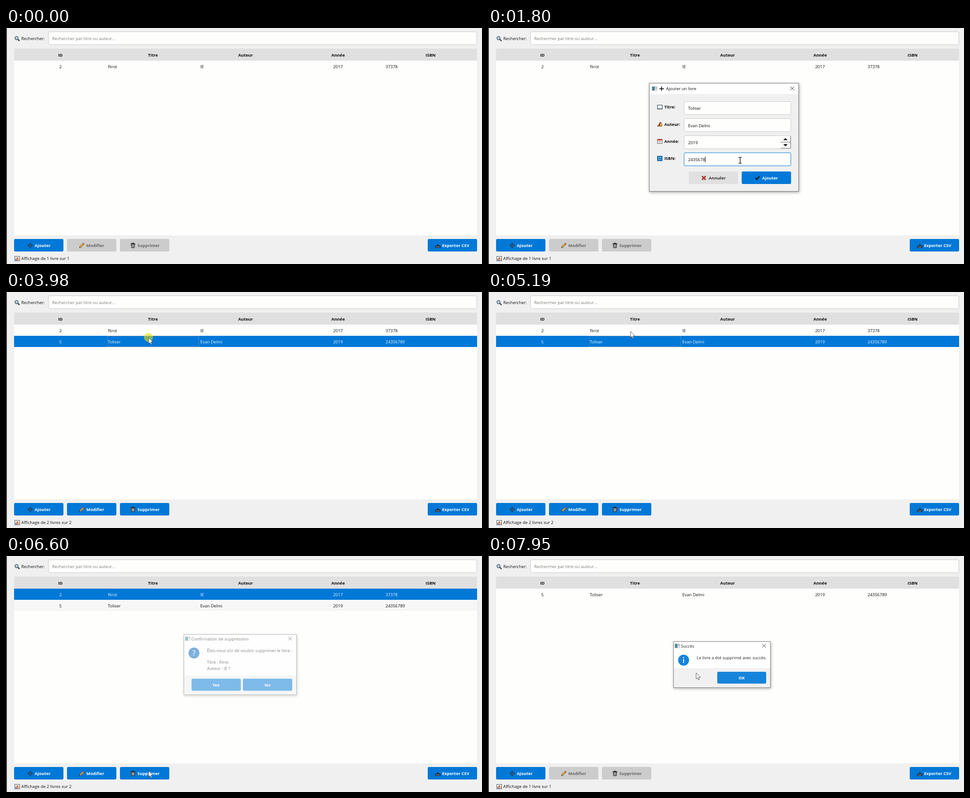
An HTML page for the animation above (8000 ms loop, 1061 by 528 pixels).

```html
<!DOCTYPE html>
<html lang="fr">
<head>
<meta charset="utf-8">
<title>Gestion de livres</title>
<style>
html, body { margin: 0; width: 100%; height: 100%; overflow: hidden; background: #f0f0f0; }
svg { display: block; width: 1061px; height: 528px; }
text { font: 9.45px "Open Sans", "Noto Sans", sans-serif; white-space: pre; }
.b { font-weight: 700; }
.m { text-anchor: middle; }
</style>
</head>
<body>
<svg id="stage" viewBox="0 0 1061 528"></svg>
<script>
const LOOP = 8000;
const BLUE = '#0078d7', HOVER = '#1484d9', DOWN = '#006abd', GREY = '#cccccc';
const BOOKS = {
  A: ['2', 'flirot', 'IE', '2017', '37378'],
  B: ['5', 'Toliser', 'Evan Delmi', '2019', '24356789']
};
const pen = document.createElement('canvas').getContext('2d');
pen.font = '9.45px "Open Sans", "Noto Sans", sans-serif';

const START = {
  list: 'A', total: 1, sel: '', cell: false, query: '', caret: false,
  dlg: '', fade: 1, cur: null, beam: false, halo: false,
  add: BLUE, del: BLUE, ok: BLUE,
  title: '', author: '', year: '2025', isbn: '', focus: 'title', picked: false
};

// [time in ms, what changes]
const STEPS = [
  [120, { cur: [74, 482], add: DOWN, halo: true }],
  [170, { add: HOVER, halo: false }],
  [310, { dlg: 'form', fade: .5, add: BLUE }],
  [405, { fade: 1, cur: [530, 180], beam: true }],
  [500, { title: 'Toli' }],
  [595, { title: 'Toliser' }],
  [690, { focus: 'author', cur: [545, 218] }],
  [785, { author: 'Evan' }],
  [880, { author: 'Evan Del' }],
  [975, { author: 'Evan Delmi' }],
  [1070, { focus: 'year', picked: true, cur: [671, 262], beam: false }],
  [1200, { year: '2', picked: false }],
  [1290, { year: '20' }],
  [1380, { year: '201' }],
  [1470, { year: '2019' }],
  [1670, { focus: 'isbn', cur: [562, 296], beam: true }],
  [1735, { isbn: '2435' }],
  [1800, { isbn: '2435678' }],
  [2000, { isbn: '24356789' }],
  [2110, { cur: [634, 340], beam: false, ok: HOVER }],
  [2350, { ok: DOWN, halo: true }],
  [2435, { dlg: '', halo: false, ok: BLUE, list: 'AB', total: 2 }],
  [2520, { dlg: 'done', fade: .9, cur: [566, 272] }],
  [2605, { fade: 1, ok: DOWN, halo: true }],
  [2690, { dlg: '', ok: BLUE, halo: false, cur: [218, 36], beam: true }],
  [2870, { query: 't', caret: true, list: 'AB' }],
  [2930, { query: 'to', list: 'B' }],
  [2990, { query: 'toli' }],
  [3180, { query: '', list: 'AB' }],
  [3350, { query: 'fl', list: 'A' }],
  [3550, { query: '', list: 'AB' }],
  [3680, { caret: false, cur: [317.5, 101.5], beam: false }],
  [3980, { sel: 'B', cell: true, halo: true }],
  [4180, { halo: false }],
  [4440, { cur: [317.5, 99] }],
  [4505, { cur: [317.5, 97] }],
  [4570, { cur: [317.5, 94] }],
  [4640, { cur: [317.5, 92] }],
  [5120, { cur: [317.5, 90] }],
  [5190, { cur: [317.5, 88] }],
  [5470, { sel: 'A', halo: true }],
  [5730, { halo: false }],
  [5810, { cur: [317.5, 140] }],
  [5890, { cur: [317.5, 250] }],
  [5970, { cur: [317.5, 370] }],
  [6050, { cur: [317.5, 452] }],
  [6130, { cur: [317.5, 480], del: HOVER }],
  [6320, { del: DOWN, cell: false, halo: true }],
  [6520, { del: BLUE, halo: false, dlg: 'confirm', fade: .5 }],
  [6615, { fade: 1 }],
  [6710, { cur: [345, 440] }],
  [6805, { cur: [405, 362] }],
  [6900, { cur: [455, 302] }],
  [7000, { cur: [476, 280], ok: HOVER }],
  [7310, { ok: DOWN, halo: true }],
  [7500, { ok: HOVER, halo: false }],
  [7605, { dlg: '', cur: [470, 270] }],
  [7710, { list: 'B', total: 1, sel: '', ok: BLUE, cur: [463.5, 261] }],
  [7810, { dlg: 'done', fade: .4 }],
  [7950, { fade: .91 }]
];
let last = START;
const STATES = [[0, START], ...STEPS.map(([t, p]) => [t, last = { ...last, ...p }])];

const rect = (x, y, w, h, fill, more = '') =>
  `<rect x="${x}" y="${y}" width="${w}" height="${h}" fill="${fill}" ${more}/>`;
const path = (d, fill, stroke = 'none', w = 1) =>
  `<path d="${d}" fill="${fill}" stroke="${stroke}" stroke-width="${w}"/>`;
const text = (x, y, s, cls = '', fill = '#111') =>
  `<text x="${x}" y="${y}" class="${cls}" fill="${fill}">${s}</text>`;
const disc = (x, y, r, fill) => `<circle cx="${x}" cy="${y}" r="${r}" fill="${fill}"/>`;
const at = (x, y, s) => `<g transform="translate(${x} ${y})">${s}</g>`;
const caretAt = (x, y, s) => rect(x + pen.measureText(s).width, y, 1, 13.5, '#000');

const icons = {
  lens: path('M7 7L11 11', 'none', '#222', 2.2) +
    '<circle cx="4.6" cy="4.6" r="3.7" fill="#a8d4ee" stroke="#444" stroke-width="1.2"/>',
  plus: path('M6 .8V11.2M.8 6H11.2', 'none', '#0a1a2c', 3) + path('M6 1.6V10.4M1.6 6H10.4', 'none', '#6f9fc8', .9),
  pencil: path('M.8 11.3L2 7.8L8.6 1.2L11 3.5L4.3 10.2Z', '#f2ad35', '#3c2c1c', .8) +
    path('M8 1.8L9.3 .6L11.6 2.8L10.3 4.1Z', '#d7796c', '#3c2c1c', .6) + path('M.6 11.5L1.3 9.3L2.8 10.8Z', '#222'),
  bin: path('M1.8 3H10.2L9.2 11.6H2.8Z', '#707477', '#2b2b2b', .9) + path('M.9 2.4H11.1M4 1H8', 'none', '#2b2b2b', 1.5) +
    path('M4.4 4.5V10M6 4.5V10M7.6 4.5V10', 'none', '#c4c8ca', .7),
  tray: path('M.5 7L3 5.5H10L12.5 7V11H.5Z', '#14273a') + path('M2 8.8H11', 'none', '#c9d3da', 1) +
    path('M5.3 1H7.7V4H9.6L6.5 7.3L3.4 4H5.3Z', '#16283c', '#7aa6cc', .4),
  chart: rect(.6, .6, 10.8, 9.8, '#f7f9fa', 'stroke="#454b50"') + rect(2.2, 5, 2, 5, '#3c7fc0') +
    rect(5, 2.5, 2, 7.5, '#d0483a') + rect(7.8, 4, 2, 6, '#e2a33a'),
  book: path('M.8 1H11.4V9.2H.8Z', '#fbfbf6', '#25384c', 1.1) + path('M.4 9.8H5.2L6.1 10.3L7 9.8H11.8', 'none', '#25384c', .9),
  hand: path('M.5 9.5L5 4.2L9.5 3L11.5 6.5L9.6 9.5Z', '#f3b63e', '#5a3719', .7) +
    path('M3.5 9L6 .8L8.2 1.2L5.2 8.8Z', '#b6432e', '#44200f', .5) + path('M.4 10H11.5', 'none', '#3b3025', .9),
  date: rect(.7, .8, 10.6, 9.8, '#faf7f3', 'stroke="#554440" stroke-width=".9"') + rect(.7, .8, 10.6, 3, '#d64d39') +
    path('M2.5 5.7H9.5M2.5 8H8', 'none', '#98908c', 1),
  digits: rect(.3, .3, 11.2, 10.8, '#0c70c2', 'stroke="#164a7a" stroke-width=".6"') +
    path('M3 3.4H5M7 3.4H9M3 7.6H5M7 7.6H9', 'none', '#fff', 1.8),
  cross: path('M1.2 1.2L9 8.8M9 1.2L1.2 8.8', 'none', '#4c1710', 3.2) + path('M1.4 1.4L8.8 8.6M8.8 1.4L1.4 8.6', 'none', '#df4936', 2),
  check: path('M1 5L4 8L10 1.6', 'none', '#101820', 2.8),
  app: rect(.4, .4, 11, 9, '#eef1f2', 'stroke="#a0a6aa" stroke-width=".7"') + rect(.6, .8, 6, 8.4, '#477f8e') +
    rect(8, 2, 2.5, 3.5, '#87a5b7')
};
const icon = (name, x, y) => at(x, y, icons[name]);

function button(x, y, w, h, fill, label, tx, name, iy = 6, color = '#fff') {
  return rect(x, y, w, h, fill, 'rx="3"') + (name ? icon(name, tx - 16, y + iy) : '') +
    text(tx, y + h / 2 + 4, label, name ? 'b' : 'b m', color);
}

function row(key, i, s) {
  const y = 73 + i * 25, on = s.sel === key, c = on ? '#eef6fd' : '#111';
  const [id, title, author, year, isbn] = BOOKS[key];
  return (on ? rect(18, y, 1032, 25, BLUE) : i ? rect(18, y, 1032, 25, '#f7f7f7') : '') +
    (on && s.cell ? rect(226, y + .5, 204, 24, 'none', 'stroke="#7d94a6" stroke-width=".7"') : '') +
    text(121.5, y + 16.6, id, 'm', c) + text(227, y + 16.6, title, '', c) + text(433, y + 16.6, author, '', c) +
    text(740, y + 16.6, year, 'm', c) + text(846, y + 16.6, isbn, '', c);
}

function page(s) {
  const tools = s.sel ? BLUE : GREY, ink = s.sel ? '#fff' : '#666';
  const heads = ['ID', 'Titre', 'Auteur', 'Année', 'ISBN'];
  const n = s.list.length;
  return rect(0, 0, 1061, 528, '#f0f0f0') + rect(0, 0, 1.6, 528, '#000') +
    icon('lens', 19, 18) + text(34, 27.2, 'Rechercher:') +
    rect(94.5, 8.5, 955, 29, '#fefefd', 'rx="3" stroke="#c6c6c6"') +
    (s.query ? text(103, 27.2, s.query) : text(103, 27.2, 'Rechercher par titre ou auteur...', '', '#7c7c7c')) +
    (s.caret ? caretAt(103, 16.3, s.query) : '') +
    rect(18, 46, 1032, 418, '#fefefd') + rect(18, 46, 1032, 27, '#e0e0e0') +
    heads.map((h, i) => text(121.3 + i * 206.3, 63.8, h, 'b m')).join('') +
    [...s.list].map((k, i) => row(k, i, s)).join('') +
    button(18, 472, 110, 28, s.add, 'Ajouter', 64, 'plus', 8.5) +
    button(136, 472, 110, 28, tools, 'Modifier', 179, 'pencil', 8.5, ink) +
    button(254, 472, 110, 28, s.sel ? s.del : GREY, 'Supprimer', 293, 'bin', 8.2, ink) +
    button(940, 472, 110, 28, BLUE, 'Exporter CSV', 972, 'tray', 9) +
    icon('chart', 19, 510.5) +
    text(34, 519.4, `Affichage de ${n} livre${n > 1 ? 's' : ''} sur ${s.total}`);
}

function frame(x, y, w, h, split) {
  return rect(x, y, w, h, '#f0f0f0', 'style="filter:drop-shadow(1px 2px 3px #0005)"') +
    rect(x, y, w, split - y, '#fff') +
    rect(x + .5, y + .5, w - 1, h - 1, 'none', 'stroke="#727272"');
}
const close = (x, y) => path(`M${x} ${y}l8.4 8.4m0 -8.4l-8.4 8.4`, 'none', '#222', 1);

function field(key, i, label, name, s) {
  const y = 164.5 + i * 38.2, on = s.focus === key, v = s[key], picked = on && s.picked;
  return icon(name, 377, y + 7) + text(393, y + 15.8, label, 'b') +
    rect(437, y, 238, 29.2, '#fefefd', `rx="3" stroke="${on ? BLUE : '#c8c8c8'}"`) +
    (picked ? rect(446, y + 8.5, pen.measureText(v).width, 13, BLUE) : '') +
    text(446, y + 18.9, v, '', picked ? '#fff' : '#111') +
    (on && !picked ? caretAt(446, y + 8.3, v) : '');
}

const dialogs = {
  form: s => frame(359, 123, 334, 243, 147.5) + icon('app', 365.3, 130.5) +
    path('M387 130.8V140.8M382 135.8H392', 'none', '#111', 1.7) +
    text(397, 139.4, 'Ajouter un livre') + close(674, 131) +
    field('title', 0, 'Titre:', 'book', s) + field('author', 1, 'Auteur:', 'hand', s) +
    field('year', 2, 'Année:', 'date', s) + field('isbn', 3, 'ISBN:', 'digits', s) +
    rect(652.5, 241.5, 21.5, 27.5, '#fbfbfb') +
    path('M652.5 255.3H674M652.5 269H674.3V241.5', 'none', '#6b6b6b', 1) +
    path('M658.3 251L663 246.2L667.7 251ZM658.3 260L663 264.8L667.7 260Z', '#000') +
    button(447.5, 321, 110, 28, '#e0e0e0', 'Annuler', 492, 'cross', 9.5, '#333') +
    button(565.5, 321, 110, 28, s.ok, 'Ajouter', 611, 'check', 9.5),
  confirm: s => frame(396, 175, 252, 136, 267) + icon('app', 399, 180) +
    text(413, 188.9, 'Confirmation de suppression') + close(629, 180.6) +
    disc(419, 217, 12.2, '#0067bd') +
    '<text x="419" y="222.8" class="m" fill="#fff" style="font-size:17px">?</text>' +
    text(448, 214.9, 'Êtes-vous sûr de vouloir supprimer le livre :') +
    text(448, 241.4, 'Titre : ' + BOOKS.A[1]) + text(448, 254.6, `Auteur : ${BOOKS.A[2]} ?`) +
    button(413.5, 274.5, 110, 27, s.ok, 'Yes', 468, '') +
    button(528, 274.5, 110, 27, BLUE, 'No', 583, ''),
  done: s => frame(413, 191, 217, 104, 251) + icon('app', 416, 196) +
    text(430, 204.8, 'Succès') + close(611.3, 196.6) + disc(436, 233, 12.2, BLUE) +
    disc(436, 227.3, 1.2, '#fff') + rect(435, 230.6, 2, 8.6, '#fff') +
    text(465, 230.8, `Le livre a été ${s.total > 1 ? 'ajouté' : 'supprimé'} avec succès.`) +
    button(511, 259, 109, 26.5, s.ok, 'OK', 565.5, '')
};

const ARROW = path('M.4 .4V14.2L3.5 11.3L5.6 16.2L7.7 15.3L5.7 10.6H9.9Z', '#fff', '#333', .8);
const BEAM = path('M-3.5 -6.7H-1L0 -6L1 -6.7H3.5M-3.5 6.7H-1L0 6L1 6.7H3.5M0 -6V6', 'none', '#000', 1.3);

function pointer(s) {
  if (!s.cur) return '';
  const [x, y] = s.cur;
  return (s.halo ? disc(x, y, 10, 'rgba(232,226,0,.58)') : '') + at(x, y, s.beam ? BEAM : ARROW);
}

const stage = document.getElementById('stage');
let shown = null, begin = null;
function tick(now) {
  begin ??= now;
  const t = (now - begin) % LOOP;
  const s = STATES.findLast(e => e[0] <= t)[1];
  if (s !== shown) {
    shown = s;
    stage.innerHTML = page(s) +
      (s.dlg ? `<g opacity="${s.fade}">${dialogs[s.dlg](s)}</g>` : '') + pointer(s);
  }
  requestAnimationFrame(tick);
}
requestAnimationFrame(tick);
</script>
</body>
</html>
```
